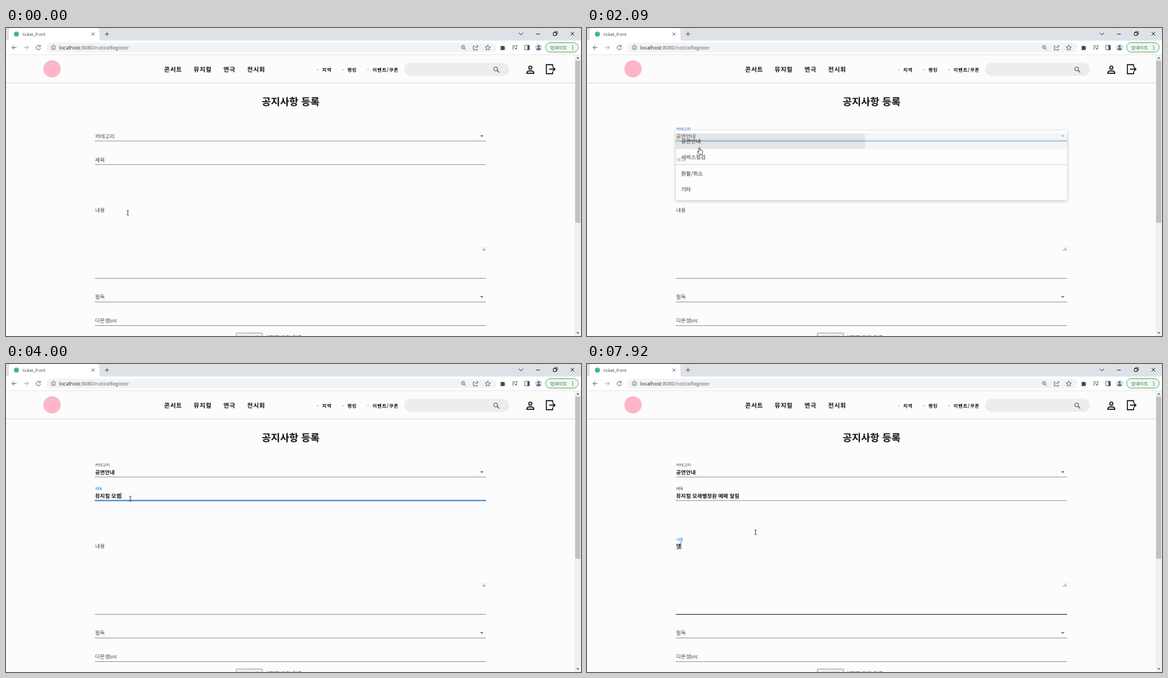
An HTML page for the animation above (8 s loop, 800 by 430 pixels).

```html
<!DOCTYPE html>
<html lang="ko">
<head>
<meta charset="utf-8">
<title>공지사항 등록</title>
<style>
  html, body { margin: 0; width: 100%; height: 100%; overflow: hidden; background: #fdfcfd; }
  svg { display: block; width: 800px; height: 430px; }
  text { font: 500 7.3px "Noto Sans CJK KR", "Noto Sans CJK JP", "Noto Sans CJK", sans-serif;
         letter-spacing: .1px; fill: #111; text-rendering: geometricPrecision; white-space: pre; }
  .ui { font-family: "Open Sans", "Noto Sans", sans-serif; font-weight: 400; letter-spacing: 0; }
  .bold { font-weight: 700; }
  .label { fill: #444; }
  .nav { font-weight: 700; font-size: 8.5px; letter-spacing: .6px; }
  .sub { font-weight: 700; font-size: 6.6px; letter-spacing: .55px; }
  .icon { fill: none; stroke: #55585c; stroke-width: .9; }
  .line { stroke: #a2a2a2; stroke-width: 1; }
  .focus { stroke: #2f80cf; stroke-width: 1.5; }
  #menu { filter: drop-shadow(0 1px 2px rgba(0, 0, 0, .45)); }
</style>
</head>
<body>
<svg viewBox="0 0 800 430">
  <defs><clipPath id="row"><rect x="123.5" y="147" width="544.5" height="22"/></clipPath></defs>
  <rect width="800" height="430" fill="#fdfcfd"/>

  <!-- browser window -->
  <rect width="800" height="18" fill="#dee1e6"/>
  <path d="M0 18Q4 18 4 14V4Q4 0 8 0H126Q130 0 130 4V14Q130 18 134 18Z" fill="#fff"/>
  <rect y="17.5" width="800" height="19.5" fill="#fff"/>
  <path d="M0 37.3H800" stroke="#dfe1e3" stroke-width=".7"/>
  <circle cx="14.5" cy="8.5" r="3.5" fill="#41b883"/>
  <text class="ui" x="23" y="10.8" style="font-size:6.1px;fill:#3c4043">ticket_front</text>
  <path class="icon" d="M119 6.5L123 10.5M123 6.5L119 10.5M137.5 8.5H143.5M140.5 5.5V11.5"/>
  <path class="icon" style="stroke:#222" d="M713.5 6.8L716.5 9.5L719.5 6.8M737.5 8.5H742.5M761.5 6.5H765.5V10.5H761.5ZM763 6.5V5H767V9H765.5M785.5 5.5L790.5 10.5M790.5 5.5L785.5 10.5"/>
  <path class="icon" d="M14.5 27.3H8.5M11.3 24.4L8.4 27.3L11.3 30.2"/>
  <path class="icon" style="stroke:#a3a6aa" d="M25.2 27.3H31.2M28.4 24.4L31.3 27.3L28.4 30.2"/>
  <path class="icon" d="M47.2 25.2A3 3 0 1 0 47.9 28M47.9 24V26.1H45.7"/>
  <rect x="56" y="20.5" width="627" height="13.5" rx="6.7" fill="#f1f3f4"/>
  <circle class="icon" cx="66" cy="27.3" r="2.9" style="stroke-width:.7"/>
  <path class="icon" d="M66 26.9V29M66 25.3V26"/>
  <text class="ui" x="74" y="29.9" style="font-size:7.05px;fill:#222">localhost<tspan fill="#5f6368">:8080/noticeRegister</tspan></text>
  <g class="icon" style="stroke-width:.8">
    <circle cx="636" cy="26.7" r="2.3"/><path d="M637.7 28.4L640 30.7M635 26.7H637"/>
    <path d="M652 25H650.2V30.7H656V29M652.3 28.3Q653 25.6 656.5 25.6M655 23.8L657 25.6L655 27.4"/>
    <path d="M670.3 23.7L671.3 26.2L674 26.4L672 28.1L672.6 30.8L670.3 29.4L668 30.8L668.6 28.1L666.6 26.4L669.3 26.2Z"/>
    <path d="M704.3 24.8H709.5M704.3 27H708M704.3 29.2H707M710.3 29V24.8H712.3"/>
    <path d="M721.8 24.2H728V30.4H721.8Z"/>
  </g>
  <path d="M725.5 24.2H728.3V30.4H725.5ZM688 25.3H689.8A1.3 1.3 0 0 1 692 25.3H693.7V27A1.2 1.2 0 0 1 693.7 29.2V30.7H688V29A1.2 1.2 0 0 0 688 27Z" fill="#44474b"/>
  <circle cx="709.5" cy="29" r="1.1" fill="#55585c"/>
  <circle cx="741" cy="27.3" r="5" fill="#cfdcec"/>
  <circle cx="741" cy="25.8" r="1.6" fill="#3f5d80"/>
  <path d="M738 30.6Q738 28 741 28Q744 28 744 30.6Z" fill="#3f5d80"/>
  <rect x="750.7" y="20.5" width="45.5" height="13.2" rx="6.6" fill="#f0f8f2" stroke="#5aa873" stroke-width=".9"/>
  <text x="757" y="29.5" style="font-size:6.3px;fill:#1e7d3c">업데이트</text>
  <path d="M788.5 24.4V31" stroke="#1e7d3c" stroke-width="1.3" stroke-dasharray="1.3 1.2"/>

  <!-- scrollbar -->
  <rect x="791" y="37.5" width="9" height="393" fill="#f1f1f1"/>
  <rect x="792" y="45.5" width="7" height="226.5" fill="#c1c1c1"/>
  <path d="M793.7 42.8L795.6 40.6L797.5 42.8ZM793.7 424.8L795.6 427L797.5 424.8Z" fill="#505050"/>

  <!-- site header -->
  <circle cx="64" cy="57" r="12" fill="#fbb6c8"/>
  <path d="M0 76.5H791" stroke="#dcdcdc" stroke-width="1"/>
  <g class="nav">
    <text class="nav" x="220" y="61.3">콘서트</text><text class="nav" x="261" y="61.3">뮤지컬</text>
    <text class="nav" x="302.5" y="61.3">연극</text><text class="nav" x="335.5" y="61.3">전시회</text>
  </g>
  <text class="sub" x="440" y="60.6">지역</text><text class="sub" x="475" y="60.6">랭킹</text><text class="sub" x="510" y="60.6">이벤트/쿠폰</text>
  <g fill="#888"><circle cx="433.7" cy="58.3" r=".7"/><circle cx="468.7" cy="58.3" r=".7"/><circle cx="503.7" cy="58.3" r=".7"/></g>
  <rect x="554" y="48.5" width="146" height="18.5" rx="9.2" fill="#ededed"/>
  <circle class="icon" cx="681.3" cy="57.2" r="2.7" style="stroke:#444"/>
  <path class="icon" style="stroke:#444;stroke-width:1.1" d="M683.3 59.2L686.3 62.2"/>
  <g fill="none" stroke="#111" stroke-width="1.4">
    <circle cx="729.5" cy="55.3" r="2.2"/>
    <path d="M724.7 63.2V62.2Q725 59.8 729.5 59.8Q734 59.8 734.3 62.2V63.2Z"/>
    <path d="M760.5 54.3V51.3H751.8V63.8H760.5V60.8M755.5 57.5H763.5M761 54.8L763.7 57.5L761 60.2"/>
  </g>
  <text class="bold" x="396" y="108" text-anchor="middle" style="font-size:13.9px;letter-spacing:0">공지사항 등록</text>

  <!-- form -->
  <path id="categoryLine" class="line" d="M123.5 157.8H668"/>
  <path id="titleLine" class="line" d="M123.5 190.7H668"/>
  <path id="contentLine" class="line" d="M123.5 349.5H668"/>
  <path class="line" d="M123.5 382.5H668M123.5 415.5H668"/>
  <path id="categoryFocus" class="focus"/>
  <path id="titleFocus" class="focus"/>
  <text id="categoryLabel" class="label">카테고리</text>
  <text id="titleLabel" class="label">제목</text>
  <text id="contentLabel" class="label">내용</text>
  <text class="label" x="124" y="378.2">필독</text>
  <text class="label" x="124" y="410.7">다온샘src</text>
  <text id="categoryValue" class="bold" x="124" y="153.5">공연안내</text>
  <text id="titleValue" class="bold" x="124" y="186.5"></text>
  <text id="contentValue" class="bold" x="124" y="256.5"></text>
  <path id="composing" stroke="#333" stroke-width=".6"/>
  <path id="arrow" d="M659.6 149.8H664.4L662 152.3Z"/>
  <path d="M659.6 374.3H664.4L662 376.8Z" fill="#666"/>
  <path d="M662.5 311L667 306.5M665 311L667 309" stroke="#555" stroke-width=".8"/>
  <rect x="320.4" y="425.8" width="36.5" height="10" rx="1" fill="#efefef" stroke="#858585" stroke-width=".7"/>
  <text x="325" y="434.7" style="font-size:6.6px">파일 선택</text>
  <text x="360" y="434.7">선택된 파일 없음</text>
  <path id="caret" stroke="#4f8096" stroke-width=".9"/>

  <g id="menu">
    <rect x="123.5" y="143" width="544.5" height="97.5" rx="1" fill="#fff"/>
    <rect id="hover" x="123.5" y="147" width="544.5" height="22" fill="#f1f1f1"/>
    <circle id="ripple" cx="153" cy="163" clip-path="url(#row)" fill-opacity=".115"/>
    <text class="bold" x="131" y="160.5">공연안내</text><text class="bold" x="131" y="183.1">서비스점검</text>
    <text class="bold" x="131" y="205.6">환불/취소</text><text class="bold" x="131" y="228.1">기타</text>
  </g>

  <g id="pointer">
    <path id="beam" d="M-1.6 -3.2H-.4L0 -2.8L.4 -3.2H1.6M0 -2.8V2.8M-1.6 3.2H-.4L0 2.8L.4 3.2H1.6" fill="none" stroke="#333" stroke-width=".8"/>
    <path id="hand" d="M-1.6 -4.3Q-.7 -5 0 -4.2V-1.2L2.8 -.6Q3.8 -.2 3.6 1L3 4.8H-1.4L-3.6 1.6Q-3.8 .4 -2.6 .7L-1.6 1.6Z" fill="#fff" stroke="#222" stroke-width=".7"/>
  </g>
</svg>
<script>
const LOOP = 8000, FRAMES = 96, LEFT = 124, CENTER = 395.75, HALF = 272.25, BLUE = '#1976d2';
const ui = Object.fromEntries([...document.querySelectorAll('[id]')].map(e => [e.id, e]));
const set = (el, attrs) => { for (const k in attrs) el.setAttribute(k, attrs[k]); };
const clamp = v => Math.max(0, Math.min(1, v));
const show = (el, on) => set(el, { visibility: on ? 'visible' : 'hidden' });

// cubic-bezier(.4, 0, .2, 1)
function ease(p) {
  p = clamp(p);
  let lo = 0, hi = 1, s = .5;
  for (let i = 0; i < 18; i++) {
    s = (lo + hi) / 2;
    const u = 1 - s;
    if (1.2 * u * u * s + .6 * u * s * s + s ** 3 < p) lo = s; else hi = s;
  }
  return 3 * (1 - s) * s * s + s ** 3;
}
const since = (t, start, length = 360) => ease((t - start) / length);

// Times of the user's actions
const OPEN = 1000, PICK = 1830, CLOSE = 1960, TITLE = 2350, LEAVE_CATEGORY = 2398,
      TYPE = 2600, KEY = 115, CONTENT = 6900, LEAVE_TITLE = 6980;

// Typed words with every state of the syllables being composed
const words = [
  'ㅁ,뮤,뮺,뮤지,뮤짘,뮤지커,뮤지컬',
  'ㅁ,모,몰,모래,모랩,모래벼,모래별,모래별ㅈ,모래별저,모래별정,모래별정ㅇ,모래별정우,모래별정워,모래별정원',
  'ㅇ,예,옘,예매',
  'ㅇ,아,알,알ㄹ,알리,알림'
];
const titleStates = [''];
let typed = '';
words.forEach((word, i) => {
  const states = word.split(',');
  if (i) titleStates.push(typed += ' ');
  titleStates.push(...states.map(s => typed + s));
  typed += states.at(-1);
});
// The space and first key of the second word fall at the same steady pace
const titleAt = t => titleStates[Math.max(0, Math.min(titleStates.length - 1, Math.floor((t - TYPE) / KEY) + 1))];
const contentAt = t => t < 7600 ? '' : t < 7690 ? 'ㄷ' : t < 7830 ? '데' : '뎃';

const path = [[90, 169.5, 258], [760, 152, 156], [1450, 152, 156], [1750, 153, 167], [2000, 153, 167],
  [2280, 173, 188], [5950, 173, 188], [6550, 199, 215.5], [7000, 199, 215.5], [7450, 234.5, 235]];
function pointerAt(t) {
  const i = path.findIndex(p => p[0] > t);
  if (i === 0) return path[0].slice(1);
  if (i < 0) return path.at(-1).slice(1);
  const [a, b] = [path[i - 1], path[i]], p = clamp((t - a[0]) / (b[0] - a[0])), k = p * p * (3 - 2 * p);
  return [a[1] + (b[1] - a[1]) * k, a[2] + (b[2] - a[2]) * k];
}

function placeLabel(el, y, float, focused) {
  set(el, { transform: `translate(${LEFT} ${y - 10.2 * float}) scale(${1 - .25 * float})` });
  el.style.fill = focused ? BLUE : '';
}
function drawFocus(el, y, scale) {
  set(el, { d: `M${CENTER - HALF * scale} ${y}H${CENTER + HALF * scale}` });
  show(el, scale > .002);
}
function shadeLine(el, amount) {
  const g = Math.round(162 - 100 * amount);
  el.style.stroke = `rgb(${g},${g},${g})`;
}

function draw(t) {
  const inCategory = t >= OPEN && t < LEAVE_CATEGORY + 180;
  const inTitle = t >= TITLE && t < LEAVE_TITLE, inContent = t >= CONTENT;

  placeLabel(ui.categoryLabel, 153.5, since(t, OPEN, 324), inCategory);
  placeLabel(ui.titleLabel, 186.5, since(t, TITLE), inTitle);
  placeLabel(ui.contentLabel, 256.7, since(t, CONTENT + 20, 324), t >= CONTENT + 60);
  drawFocus(ui.categoryFocus, 157.6, since(t, OPEN) - since(t, LEAVE_CATEGORY));
  drawFocus(ui.titleFocus, 190.5, since(t, TITLE) - since(t, LEAVE_TITLE));
  shadeLine(ui.categoryLine, since(t, 650) - since(t, 2100));
  shadeLine(ui.titleLine, since(t, 2130) - since(t, 6150));
  shadeLine(ui.contentLine, since(t, 60, 250) - since(t, 330) + since(t, 6400));
  set(ui.arrow, { fill: inCategory ? BLUE : '#666' });

  show(ui.categoryValue, t >= CLOSE);
  ui.titleValue.textContent = titleAt(t);
  ui.contentValue.textContent = contentAt(t);

  const menu = clamp((t - OPEN) / 300) - clamp((t - CLOSE) / 300);
  set(ui.menu, { opacity: menu });
  show(ui.menu, menu > 0);
  set(ui.ripple, { r: t < PICK ? 0 : 30 + (t - PICK) * .805 });

  const value = inContent ? ui.contentValue : ui.titleValue;
  const width = value.textContent ? value.getComputedTextLength() : 0;
  const y = inContent ? 248 : 179;
  const lastKey = inContent ? (t < 7600 ? CONTENT : 7600)
    : t < TYPE ? TITLE : TYPE + KEY * Math.min(titleStates.length - 2, Math.floor((t - TYPE) / KEY));
  set(ui.caret, { d: `M${LEFT + width} ${y}V${y + 10 - (inContent ? 0 : 1)}` });
  show(ui.caret, (inTitle || inContent) && (t - lastKey) % 1060 < 530);
  set(ui.composing, { d: `M${LEFT} 258H${LEFT + width}` });
  show(ui.composing, inContent && width > 0);

  const [px, py] = pointerAt(t), overMenu = py < 172;
  set(ui.pointer, { transform: `translate(${px} ${py})` });
  show(ui.beam, !overMenu);
  show(ui.hand, overMenu);
}

function tick(now) {
  const step = LOOP / FRAMES;
  draw(Math.floor((now % LOOP) / step) * step);
  requestAnimationFrame(tick);
}
draw(0);
requestAnimationFrame(tick);
</script>
</body>
</html>
```
